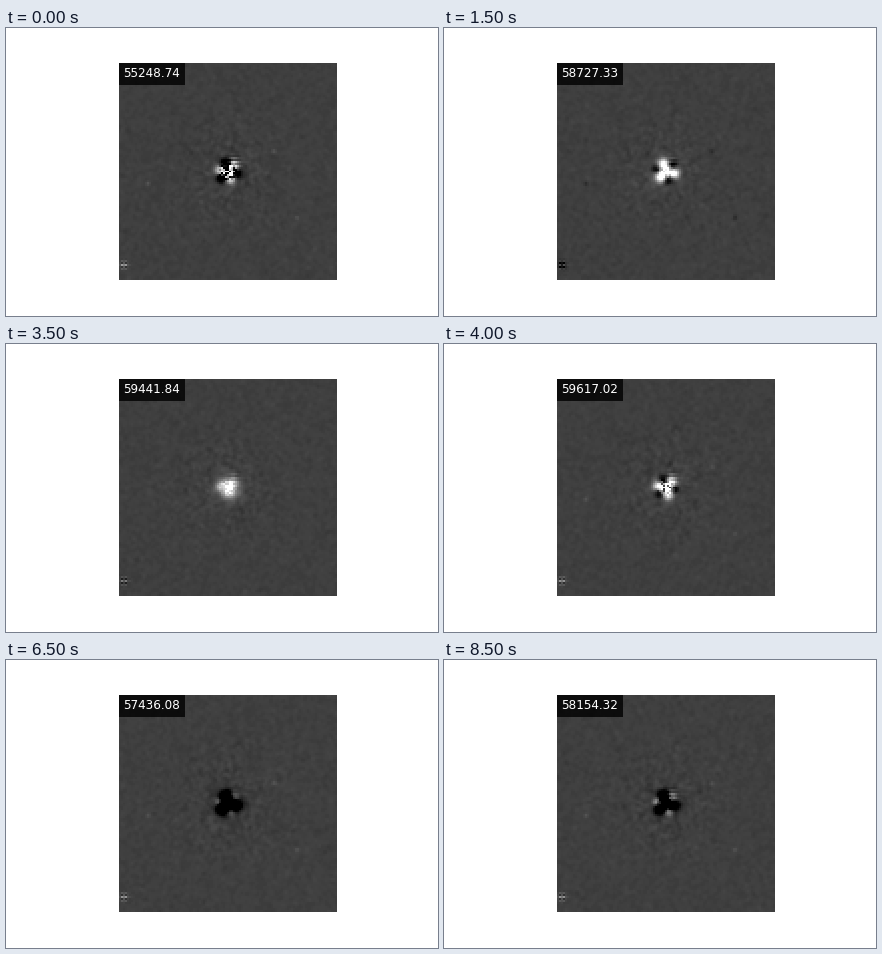
These frames come from a looping animation (432x288 px, 9 s). A matplotlib script:

```python
import numpy as np
import matplotlib.pyplot as plt
from matplotlib.animation import FuncAnimation

W, H, DPI = 432, 288, 72
LEFT, RIGHT, TOP, BOTTOM = 113, 331, 35, 252
N = 109
BASE = 63
EPOCHS = 18

# epoch: date, star level, strength of the three-lobed pattern
KEYS = {
    0: (55248.74, 0.0, -1.0),
    3: (57074.86, -0.7, -1.0),
    7: (57797.31, -1.0, -0.7),
    9: (58154.32, -0.5, -0.9),
    11: (58727.33, 0.6, 1.0),
    13: (59091.49, 1.0, 1.2),
    16: (59617.02, 0.4, -0.8),
}
ORDER = sorted(range(EPOCHS), key=str)   # 0, 1, 10, 11, ... 17, 2, ... 9

cell = (np.arange(N) + 0.5) / N
X, Y = np.meshgrid(LEFT + cell * (RIGHT - LEFT), TOP + cell * (BOTTOM - TOP))
ROWS = np.where(np.arange(N) % 2, 1, -1)[:, None]
CHECK = 0.6 * ROWS + 0.4 * ROWS * ROWS.T

CX, CY = 222, 143.5
R = np.hypot(X - CX, Y - CY)
ANGLE = np.arctan2(Y - CY, X - CX)
LOBES = np.exp(-((R - 9) / 3.3) ** 2 / 2) * np.cos(3 * (ANGLE - np.radians(13)))


def blob(x, y, s):
    return np.exp(-((X - x) ** 2 + (Y - y) ** 2) / (2 * s * s))


def grain(seed):
    g = np.random.default_rng(seed).normal(size=(N, N))
    for ax_no in (0, 1):
        g = g + 0.5 * (np.roll(g, 1, ax_no) + np.roll(g, -1, ax_no))
    return g / g.std()


STATIC = grain(100)
SPREAD = 2.0 + 3.2 * blob(CX, CY, 32)
CORE = blob(CX, CY, 6)
HALO = blob(CX, CY, 11)
SPECKS = blob(CX, CY, 4.2)
RIPPLE = blob(228, 134, 4)
CORNER = blob(118, 237, 2.6)
SPOTS = blob(268, 123, 1.8) + blob(291, 190, 1.6) + blob(142, 156, 1.6)


def state(epoch):
    return [np.interp(epoch, list(KEYS), col) for col in zip(*KEYS.values())]


def picture(epoch, level, lobes):
    mixed = 1 - abs(level)
    rng = np.random.default_rng(epoch + 1)
    img = BASE + SPREAD * (0.7 * STATIC + 0.7 * grain(200 + epoch))
    img += level * (400 * CORE + 30 * HALO) + 140 * lobes * LOBES
    img += 520 * mixed ** 2 * SPECKS * rng.choice([-1, 0.3, 1], size=(N, N))
    img += 50 * mixed * ROWS * RIPPLE
    img += (70 * CHECK - 50 * lobes) * CORNER - 22 * lobes * SPOTS
    return np.clip(img, 0, 255)


fig = plt.figure(figsize=(W / DPI, H / DPI), dpi=DPI, facecolor="white")
ax = fig.add_axes([0, 0, 1, 1])
ax.axis("off")
photo = ax.imshow(np.full((N, N), BASE), cmap="gray", vmin=0, vmax=255,
                  interpolation="nearest", aspect="auto",
                  extent=(LEFT, RIGHT, BOTTOM, TOP))
ax.set_xlim(0, W)
ax.set_ylim(H, 0)
ax.fill_between([113, 179], 35, 57, color="black", lw=0, alpha=0.8)
label = ax.text(117.5, 49, "", color="white", fontsize=12,
                family="DejaVu Sans", va="baseline")


def draw(i):
    epoch = ORDER[i]
    date, level, lobes = state(epoch)
    photo.set_data(picture(epoch, level, lobes))
    label.set_text(f"{date:.2f}")
    return photo, label


anim = FuncAnimation(fig, draw, frames=EPOCHS, interval=500,
                     repeat=True, repeat_delay=0)
plt.show()
```
